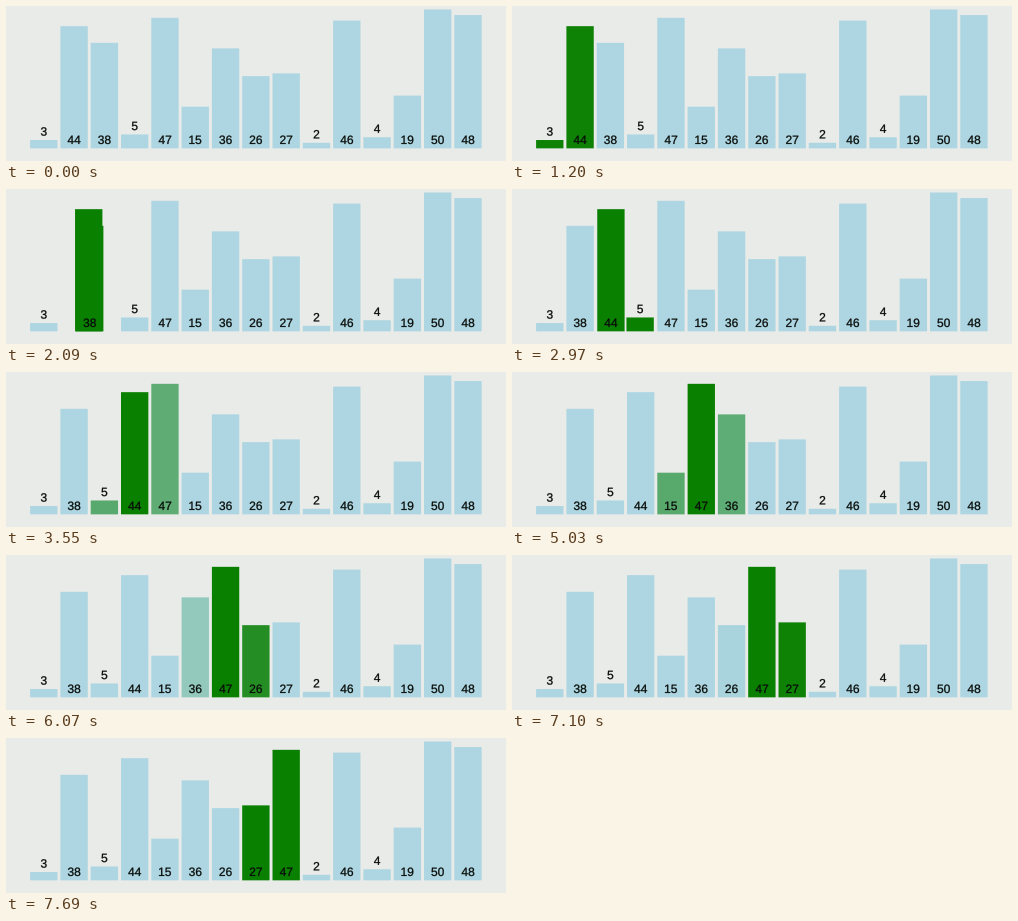
A matplotlib script for the animation above (7.99 s loop, 500 by 155 pixels).

```python
import matplotlib.pyplot as plt
import numpy as np
from matplotlib.animation import FuncAnimation
from matplotlib.patches import PathPatch, Rectangle
from matplotlib.textpath import TextPath
from matplotlib.transforms import Affine2D

W, H = 500, 155
LOOP, TICK = 7990, 10
VALUES = [3, 44, 38, 5, 47, 15, 36, 26, 27, 2, 46, 4, 19, 50, 48]

LEFT, PITCH, BAR_W = 24.1, 30.3, 27.35
BASE, UNIT = 142.35, 2.777
BACK = "#e9ebe9"
IDLE = np.array([173, 214, 226]) / 255
LIT = np.array([10, 128, 0]) / 255

# The picture refreshes every REFRESH ms; a move starts every BEAT ms
REFRESH = 147.88
FIRST, BEAT, MOVE = 936, 493, 300


def ease(u):
    u = min(max(u, 0), 1)
    return 4 * u ** 3 if u < .5 else 1 - 4 * (1 - u) ** 3


def shade(level):
    return IDLE + (LIT - IDLE) * level


def state(t):
    """Slot and highlight level of each bar in the bubble sort pass."""
    t = REFRESH * (t // REFRESH)
    order = list(range(len(VALUES)))
    slots = np.arange(len(VALUES), dtype=float)
    glow = np.zeros(len(VALUES))
    start = FIRST
    for j in range(len(VALUES) - 1):
        if t < start:
            break
        p = ease((t - start) / MOVE)
        a, b = order[j], order[j + 1]
        glow[order[max(j - 1, 0)]] = 1 - p
        glow[a] = 1 if j else p
        glow[b] = p
        start += BEAT
        if VALUES[a] > VALUES[b]:
            q = ease((t - start) / MOVE)
            slots[a], slots[b] = j + q, j + 1 - q
            order[j], order[j + 1] = b, a
            start += BEAT
    return slots, glow


plt.rcParams["font.family"] = "Liberation Sans"
fig = plt.figure(figsize=(W / 100, H / 100), dpi=100, facecolor=BACK)
ax = fig.add_axes([0, 0, 1, 1])
ax.set_xlim(0, W)
ax.set_ylim(H, 0)
ax.axis("off")


def add_bar(i, value):
    bar = Rectangle((0, BASE - value * UNIT), BAR_W, value * UNIT, lw=0,
                    snap=False, zorder=2 * i)
    return ax.add_patch(bar)


def add_label(i, value):
    """A centred number that is moved sideways by its own transform."""
    text = TextPath((0, 0), str(value), size=12)
    box = text.get_extents()
    baseline = (BASE if value > 10 else BASE - value * UNIT) - 4.4
    place = Affine2D().translate(-(box.x0 + box.x1) / 2, 0)
    path = place.scale(1, -1).translate(0, baseline).transform_path(text)
    return ax.add_patch(PathPatch(path, color="#080c08", lw=.2,
                                  snap=False, zorder=2 * i + 1))


bars = [add_bar(i, v) for i, v in enumerate(VALUES)]
labels = [add_label(i, v) for i, v in enumerate(VALUES)]


def draw(frame):
    for bar, label, slot, level in zip(bars, labels, *state(frame * TICK)):
        x = LEFT + PITCH * slot
        bar.set_x(x)
        bar.set_facecolor(shade(level))
        label.set_transform(Affine2D().translate(x + BAR_W / 2, 0)
                            + ax.transData)
    return bars + labels


anim = FuncAnimation(fig, draw, frames=LOOP // TICK, interval=TICK,
                     init_func=lambda: draw(0), repeat=True, repeat_delay=0)
plt.show()
```
